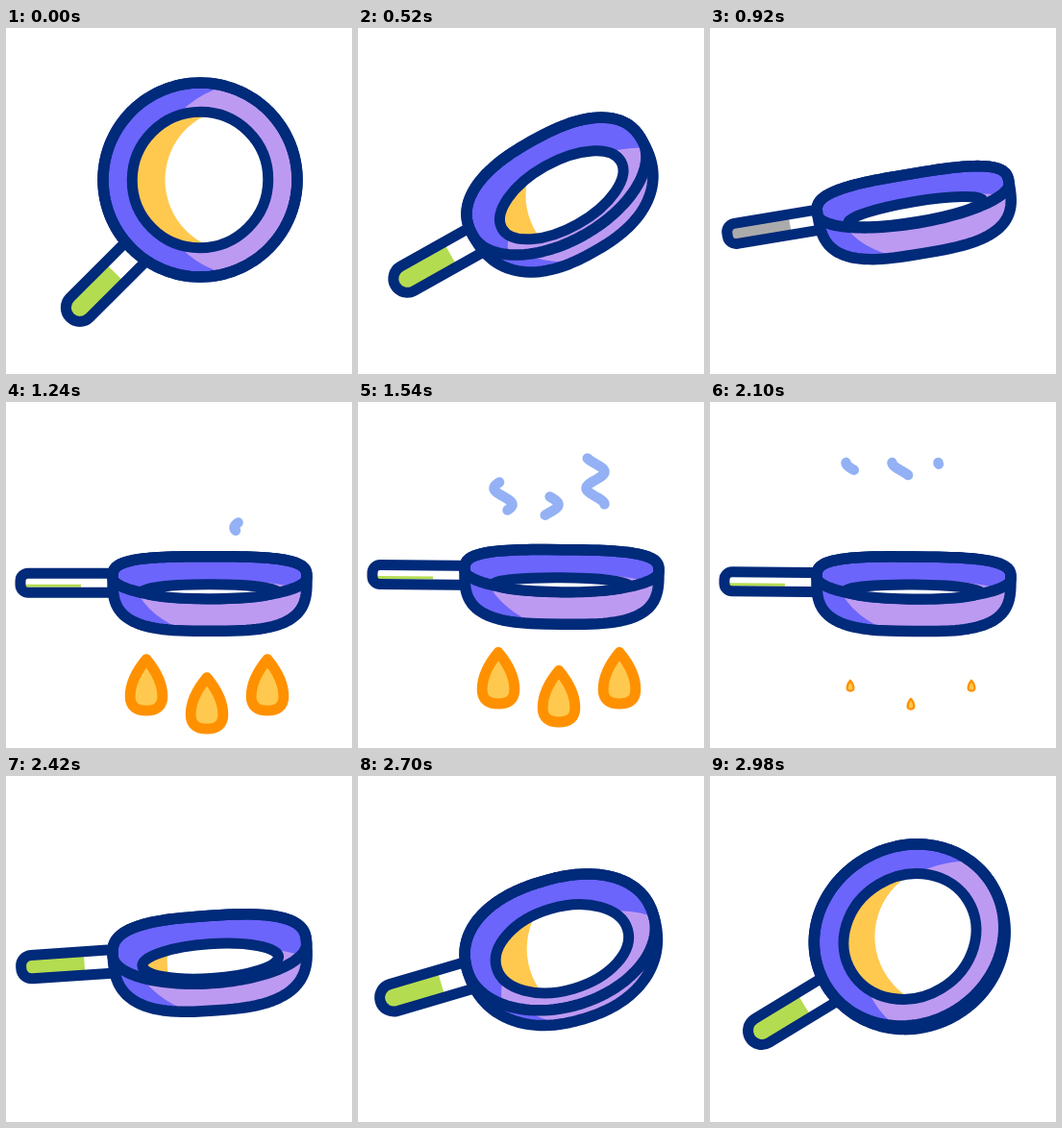
Recreate the animation shown at these times as an HTML page with a canvas. Size 360 px wide and 360 px high, loop 3 s.

```html
<!DOCTYPE html>
<html lang="en">
<head>
<meta charset="utf-8">
<title>Lens to pan</title>
<style>
  html, body { margin: 0; width: 100%; height: 100%; overflow: hidden; background: #fff; }
  canvas { display: block; width: 360px; height: 360px; }
</style>
</head>
<body>
<canvas id="stage"></canvas>
<script>
const LOOP = 3000;
const NAVY = '#002a7a', PURPLE = '#6b65fb', LILAC = '#bd9af2', YELLOW = '#ffc94f';
const GREEN = '#b4dc50', GREY = '#ababab', ORANGE = '#ff9100', STEAM = '#93b1f4';
const RADIUS = 101, LENS = 71;

const canvas = document.getElementById('stage');
const c = canvas.getContext('2d');
const dpr = window.devicePixelRatio || 1;
canvas.width = canvas.height = 360 * dpr;

const mix = (a, b, u) => a + (b - a) * u;
const clamp = u => Math.min(1, Math.max(0, u));
function smooth(from, to, t) {
  const u = clamp((t - from) / (to - from));
  return u * u * (3 - 2 * u);
}

// turn: 1 = handle at 45 degrees, 0 = level
// open: 1 = lens seen from the front, 0 = pan seen from the side
function pose(t) {
  const folding = t < 1320;
  const turn = folding ? 1 - smooth(0, 1320, t) : smooth(2180, 3440, t);
  const open = folding ? turn ** 2 : 1 - (1 - turn) ** 1.8;
  const toss = 28 * Math.sin(Math.PI * clamp((t - 1430) / 650)) ** 2;
  const rim = mix(22, RADIUS, open);
  return {
    turn, open, rim,
    x: 212 - 10 * turn ** 2,
    y: 183 - 25 * turn - toss,
    angle: mix(.5, -45, turn) * Math.PI / 180,
    base: rim + 33.5 * (1 - open) ** .9,
    lens: mix(7.5, 70.5, open),
    drop: 14.5 * (1 - open),
    power: 2 + 1.2 * (1 - open) ** 2
  };
}

// Half of a superellipse; side -1 is the upper half, drawn left to right
function half(path, b, power, side) {
  for (let i = 0; i <= 60; i++) {
    const th = Math.PI * i / 60, co = Math.cos(th), si = Math.max(0, Math.sin(th));
    path.lineTo(side * RADIUS * Math.sign(co) * Math.abs(co) ** (2 / power),
      side * b * si ** (2 / power));
  }
}

function halves(top, topPower, bottom, bottomPower) {
  const path = new Path2D();
  half(path, top, topPower, -1);
  half(path, bottom, bottomPower, 1);
  path.closePath();
  return path;
}

function oval(x, y, a, b) {
  const path = new Path2D();
  path.ellipse(x, y, a, b, 0, 0, 2 * Math.PI);
  return path;
}

function fill(path, color) { c.fillStyle = color; c.fill(path); }

function stroke(path, color, width) {
  c.strokeStyle = color;
  c.lineWidth = width;
  c.stroke(path);
}

// Fill an area, then a patch that is cut off at its edge
function fillTwo(area, color, patch, patchColor, patchAngle = 0) {
  c.save();
  fill(area, color);
  c.clip(area);
  c.rotate(patchAngle);
  fill(patch, patchColor);
  c.restore();
}

function drawHandle(p, t) {
  const wide = Math.min(1, 3 * p.open), w = mix(10, 14.5, wide);
  const shape = new Path2D(), grip = new Path2D();
  shape.roundRect(-197, 5.5 - w, 120, 2 * w, w * mix(.8, 1, wide));
  const level = p.open < .03;
  if (level) grip.rect(-192, 7, 58, 3);
  else grip.rect(-200, 5 - w, 69, 2 * w + 2);
  fillTwo(shape, '#fff', grip, !level && p.open < .08 && t < 1320 ? GREY : GREEN);
  stroke(shape, NAVY, 11);
}

function drawPan(p, t) {
  const body = halves(p.rim, p.power, p.base, p.power);
  const rim = halves(p.rim, p.power, p.rim, 2);
  const lens = oval(0, p.drop, LENS, p.lens);
  const shine = oval(mix(.1, .364, p.open) * RADIUS, mix(1.1, .364, p.open) * p.rim, RADIUS, p.rim);

  // The glint stays upright and round while the lens turns
  const glint = 38 * (1 - Math.exp(-9 * p.open));
  const upright = oval(glint - p.drop * Math.sin(p.angle), p.drop * Math.cos(p.angle), 74.5, 74.5);

  c.save();
  c.translate(p.x, p.y);
  c.rotate(p.angle);
  drawHandle(p, t);
  fillTwo(body, PURPLE, oval(30, -10, 112, p.base + 20), LILAC);
  fillTwo(rim, PURPLE, shine, LILAC);
  stroke(body, NAVY, 11.5);
  stroke(rim, NAVY, 11.5);
  fillTwo(lens, YELLOW, upright, '#fff', -p.angle);
  stroke(lens, NAVY, 11);
  c.restore();
}

const DROP = new Path2D('M0-54C10-42 17-28 17-15C17-4 10 0 0 0C-10 0-17-4-17-15C-17-28-10-42 0-54Z');

function drawFlame(i, t) {
  const grow = smooth(1000, 1220, t);
  const size = .99 * grow * (1 - smooth(1980, 2150, t));
  if (size < .02) return;
  const y = (i === 1 ? 333 : 314) - .024 * (t - 1540) + 10 * (1 - grow);
  c.save();
  c.translate(146 + 63 * i, y);
  c.scale(size, size);
  fill(DROP, YELLOW);
  stroke(DROP, ORANGE, 11);
  c.restore();
}

// A window of a wavy line: its head rises quickly, its tail follows slowly
const WISPS = [
  { x: 151, arrive: 1680, leave: 2190 },
  { x: 199, arrive: 1755, leave: 2250 },
  { x: 247, arrive: 1555, leave: 2120 }
];

function drawWisp(w, t, panY) {
  const head = Math.max(41, 41 + .2 * (w.arrive - t));
  const tail = Math.min(112, 41 + .0875 * (w.leave - t));
  if (tail - head < .5) return;
  const path = new Path2D();
  for (let i = 0; i <= 50; i++) {
    const y = mix(head, tail, i / 50);
    path.lineTo(w.x - 9.5 * Math.cos((y - 41) * Math.PI / 17), y + panY - 161);
  }
  stroke(path, STEAM, 10.5);
}

function draw(t) {
  const p = pose(t);
  c.setTransform(dpr, 0, 0, dpr, 0, 0);
  c.fillStyle = '#fff';
  c.fillRect(0, 0, 360, 360);
  c.lineCap = c.lineJoin = 'round';
  WISPS.forEach(w => drawWisp(w, t, p.y));
  for (let i = 0; i < 3; i++) drawFlame(i, t);
  drawPan(p, t);
}

const start = performance.now();
function tick() {
  draw((performance.now() - start) % LOOP);
  requestAnimationFrame(tick);
}
tick();
</script>
</body>
</html>
```
